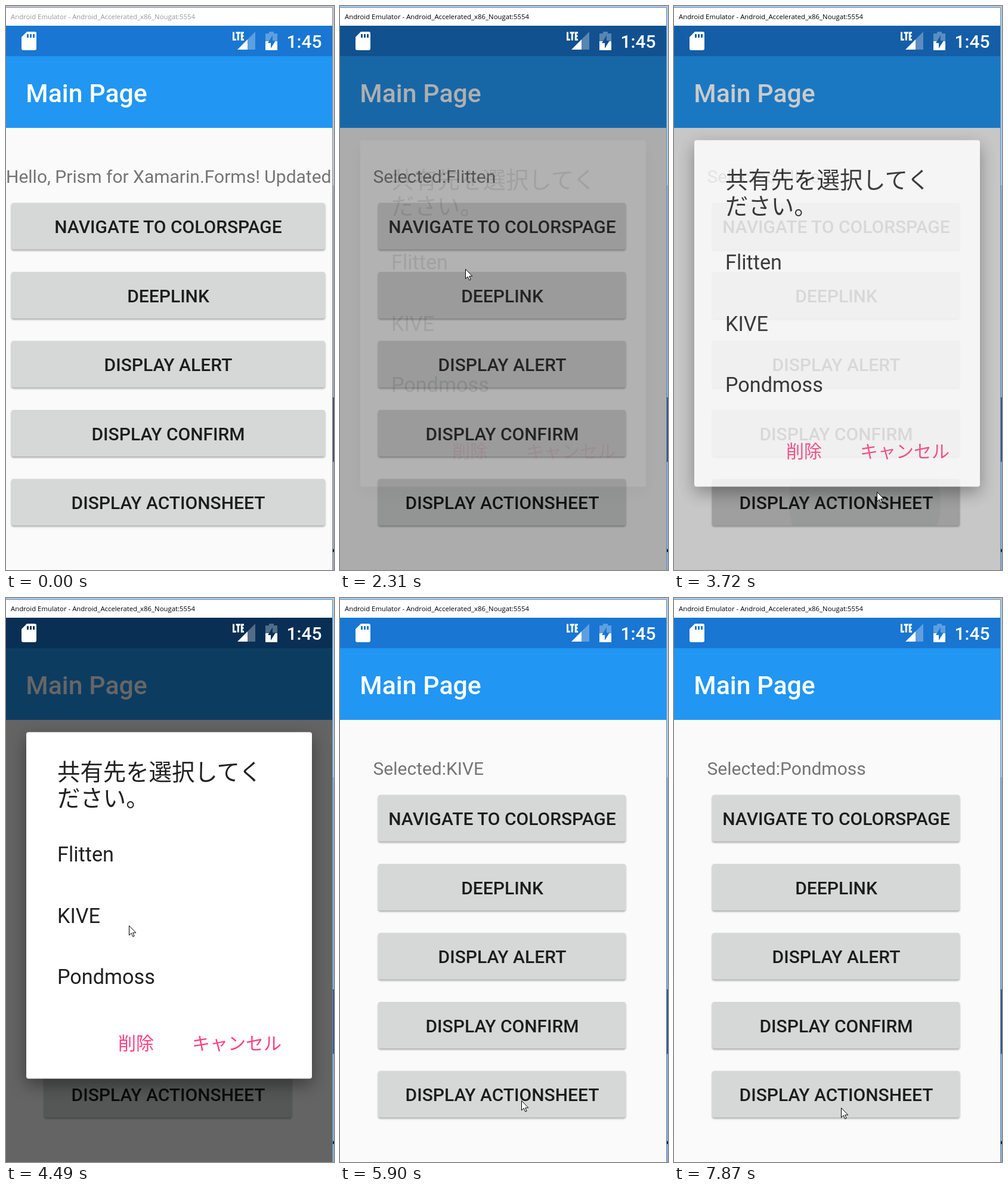
An HTML page that plays this animation: 550 px wide and 944 px high, repeating every 8000 ms.

```html
<!DOCTYPE html>
<html lang="en">
<head>
<meta charset="utf-8">
<title>Action sheet demo</title>
<style>
  html, body { margin: 0; width: 100%; height: 100%; overflow: hidden; }
  body > svg { display: block; width: 100vw; height: 100vh; }
  text { font: 30px Roboto, sans-serif; white-space: pre; }
  .medium, .medium text { font-weight: 500; }
  .title { font: 11.35px "Open Sans", sans-serif; }
  .ja { font-family: "Noto Sans CJK JP", "Noto Sans CJK", sans-serif; }
  .ask { font-size: 38.4px; }
  .row { font-size: 34.2px; }
  .button { fill: #d6d7d7; filter: drop-shadow(0 2px 1.5px #0005); }
  #sheet { filter: drop-shadow(0 10px 14px #0006); }
</style>
</head>
<body>
<svg viewBox="0 0 550 944">
  <defs>
    <linearGradient id="charge" x2="0" y2="1">
      <stop offset=".52" stop-color="#fff" stop-opacity=".3"/>
      <stop offset=".52" stop-color="#fff"/>
    </linearGradient>
  </defs>

  <!-- desktop sliver and window frame -->
  <path fill="#c3c8d2" d="M0 0H550V944H0Z"/>
  <path fill="#a3a8b5" d="M548 300H550V944H548Z"/>
  <path fill="#514d70" d="M548 655H550V763H548Z"/>
  <path fill="#222" d="M548 909H550V914H548Z"/>
  <path fill="#fff" d="M0 2H547V33H0Z"/>
  <path id="frame" fill="none" d="M0 2.5H547.5V944"/>
  <text id="title" class="title" x="8" y="22">Android Emulator - Android_Accelerated_x86_Nougat:5554</text>

  <!-- app -->
  <path fill="#fafafa" d="M0 33H547V944H0Z"/>
  <path fill="#1976d2" d="M0 33H547V84H0Z"/>
  <path fill="#2196f3" d="M0 84H547V204H0Z"/>
  <text class="medium" x="33.200" y="160.500" fill="#fff" style="font-size:42.8px">Main Page</text>
  <text id="label" y="296" fill="#757575"></text>
  <g id="buttons"></g>
  <svg id="ink" y="791.5" height="78">
    <rect width="100%" height="78" rx="4" opacity=".07"/>
    <circle id="wave" cy="39" opacity=".04"/>
  </svg>
  <g id="captions" class="medium" fill="#1d1d1d" text-anchor="middle"></g>

  <path id="dim" d="M0 33H547V944H0Z"/>

  <!-- status icons -->
  <path fill="#fff" fill-rule="evenodd" d="M35 43H48Q51 43 51 46V71Q51 74 48 74H29Q26 74 26 71V52ZM35 47V53H38V47ZM40 47V53H43V47ZM45 47V53H48V47Z"/>
  <path fill="none" stroke="#fff" stroke-width="3" d="M381.500 43.500V56.200H386M385.500 44.800H393M389.300 44.500V57.500M399 44.800H395.300V56.200H399M395.300 50.300H398.500"/>
  <path fill="#fff" opacity=".3" d="M405 56L418 43V73H405Z"/>
  <path fill="#fff" d="M388 73L405 56V73Z"/>
  <path fill="url(#charge)" fill-rule="evenodd" d="M441 43H449V46H455V74H435V46H441ZM447 49L439 62H444V71L452 58H447Z"/>
  <text class="medium" x="470.500" y="70" fill="#fff">1:45</text>

  <g id="sheet">
    <rect x="34" y="224.5" width="479" height="580" rx="4" fill="#fff"/>
    <g fill="#212121">
      <text class="ja ask" x="86" y="304.500">共有先を選択してく</text>
      <text class="ja ask" x="86" y="348.500">ださい。</text>
      <g id="rows"></g>
    </g>
    <g fill="#ff4081">
      <text class="ja" x="188" y="756">削除</text>
      <text class="ja" x="312" y="756">キャンセル</text>
    </g>
  </g>

  <path id="cursor" fill="#fff" stroke="#000" d="M.5 .5V16.500L4.200 13L6.800 18.800L9.200 17.800L6.700 12.200H11.800Z"/>
</svg>
<script>
const $ = id => document.getElementById(id);
const set = (el, attrs) => { for (const k in attrs) el.setAttribute(k, attrs[k]); };
const clamp = v => Math.max(0, Math.min(1, v));

function add(parent, tag, attrs, text = "") {
  const el = document.createElementNS("http://www.w3.org/2000/svg", tag);
  set(el, attrs);
  el.textContent = text;
  parent.append(el);
  return el;
}

const options = ["Flitten", "KIVE", "Pondmoss"];
const captions = ["NAVIGATE TO COLORSPAGE", "DEEPLINK", "DISPLAY ALERT", "DISPLAY CONFIRM", "DISPLAY ACTIONSHEET"];

options.forEach((name, i) => add($("rows"), "text", { class: "row", x: 86, y: 441 + i * 102.7 }, name));
const buttons = captions.map((name, i) => {
  add($("captions"), "text", { x: 272, y: 380 + i * 115.5 }, name);
  return add($("buttons"), "rect", { class: "button", y: 329.5 + i * 115.5, height: 78, rx: 4 });
});

// each visit to the sheet: button pressed, option picked
const visits = [
  { open: 990, pick: 2230 },
  { open: 3650, pick: 4820 },
  { open: 6220, pick: 7000 }
];

// pointer path: time, x, y
const path = [
  [140, 425, 940], [520, 323, 842], [689, 323, 842], [690, 317, 829],
  [1300, 317, 829], [1780, 210, 455], [1860, 210, 453], [2010, 210, 440],
  [2560, 210, 440], [3080, 342, 831], [3250, 340, 813],
  [3900, 340, 813], [4420, 206, 550], [4490, 206, 548], [4660, 206, 538],
  [4980, 206, 538], [5590, 303, 858], [5660, 304, 857], [5780, 304, 857], [5900, 304, 841],
  [6380, 304, 841], [6770, 216, 642], [7150, 216, 642], [7780, 278, 852], [7870, 280, 853]
];

function pointer(t) {
  const i = path.findIndex(p => p[0] > t);
  if (i < 0) return path.at(-1).slice(1);
  const [t0, x0, y0] = path[i - 1], [t1, x1, y1] = path[i];
  const u = (t - t0) / (t1 - t0), e = u * u * (3 - 2 * u);
  return [x0 + (x1 - x0) * e, y0 + (y1 - y0) * e];
}

function draw(t) {
  const active = t >= 690;
  set($("title"), { fill: active ? "#000" : "#999" });
  set($("frame"), { stroke: active ? "#3a9be0" : "#8d919b" });

  const picked = visits.findLastIndex(v => t >= v.pick);
  const wide = picked < 0;
  $("label").textContent = wide ? "Hello, Prism for Xamarin.Forms! Updated" : "Selected:" + options[picked];
  set($("label"), { x: wide ? 0 : 55.5 });
  const box = wide ? { x: 9, width: 526 } : { x: 64, width: 415 };
  buttons.forEach(b => set(b, box));

  let sheet = 0, dim = 0, ink = 0;
  const visit = visits.findLast(v => t >= v.open);
  if (visit) {
    const age = t - visit.open, gone = t - visit.pick;
    sheet = gone < 0 ? 1 - (1 - clamp(age / 120)) ** 2 : (1 - clamp(gone / 110)) ** 2;
    dim = gone < 0 ? clamp(age / 210) : 1 - clamp(gone / 170);
    ink = clamp((400 - age) / 300);
    set($("wave"), { cx: 320 - box.x, r: 110 + age * .245 });
  }
  set($("sheet"), { opacity: sheet });
  set($("dim"), { opacity: dim * .6 });
  set($("ink"), { ...box, opacity: ink });

  const shown = t >= path[0][0];
  set($("cursor"), {
    visibility: shown ? "visible" : "hidden",
    transform: shown ? `translate(${pointer(t).map(Math.round)})` : ""
  });
}

const start = performance.now();
function tick() {
  draw((performance.now() - start) % 8000);
  requestAnimationFrame(tick);
}
tick();
</script>
</body>
</html>
```
